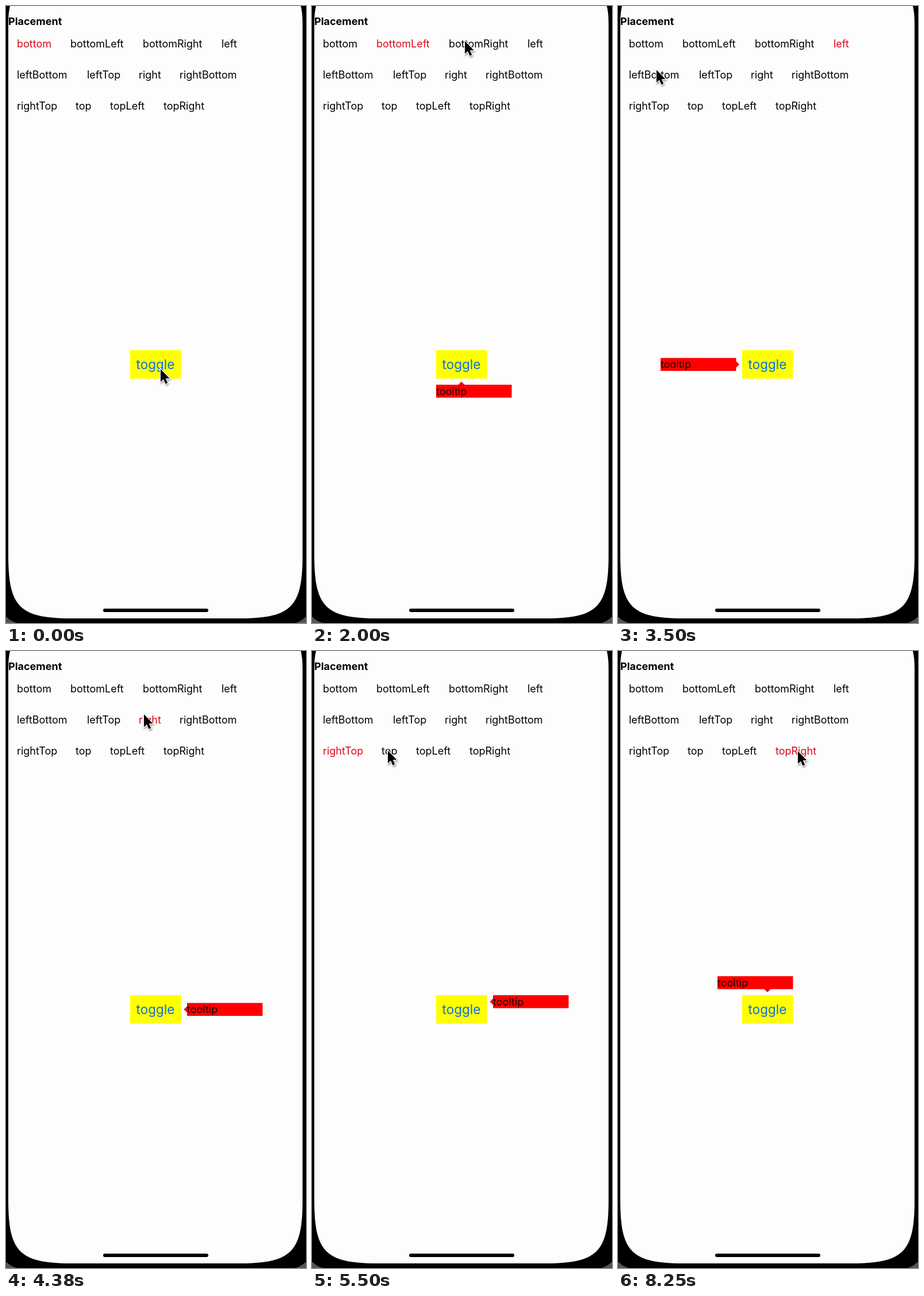
Animation of 522x1072 px, one loop 8370 ms. Source, as an HTML page:

```html
<!DOCTYPE html>
<html lang="en">
<head>
<meta charset="utf-8">
<title>Tooltip placement</title>
<style>
  html, body { margin: 0; width: 100%; height: 100%; overflow: hidden; background: #000; }
  svg { display: block; width: 522px; height: 1072px; font: 18px Inter, sans-serif; }
</style>
</head>
<body>
<svg viewBox="0 0 522 1072">
  <path fill="#555" d="M0 1061Q8 1069 19 1072H0ZM522 1061Q514 1069 503 1072H522Z"/>
  <path fill="#fdfdfd" d="M7 0Q4 12 4 30V954C4 1044 23 1064 114 1064H406C497 1064 516 1044 516 954V30Q516 12 513 0Z"/>
  <rect x="169" y="1047" width="183" height="6" rx="3"/>
  <text x="4" y="33" font-weight="700">Placement</text>
  <g id="options"></g>
  <rect x="216" y="598" width="88.5" height="49.5" fill="#ff0"/>
  <text x="260" y="631" font-size="22.5" text-anchor="middle" fill="#0870e4">toggle</text>
  <g id="tooltip">
    <rect width="131.5" height="22.5" fill="#f00"/>
    <path id="arrow" fill="#f00" d="M-6 .5L0 -5.5L6 .5Z"/>
    <text y="17.5" fill="#180000">tooltip</text>
  </g>
  <path id="cursor" d="M0 0V22L5 17.5L8.5 25.5L12.3 24L8.8 16H15.5Z" stroke="#fff" stroke-width="2.4"
    paint-order="stroke" style="filter: drop-shadow(1px 2px 1.5px #0006)"/>
</svg>
<script>
const LOOP = 8370, STEP = 125;
const $ = id => document.getElementById(id);

const rows = [
  { bottom: 19, bottomLeft: 112, bottomRight: 238, left: 375 },
  { leftBottom: 19, leftTop: 141, right: 231, rightBottom: 302 },
  { rightTop: 19, top: 121, topLeft: 181, topRight: 274 }
];
const labels = {};
rows.forEach((row, i) => {
  for (const [name, x] of Object.entries(row)) {
    const label = document.createElementNS('http://www.w3.org/2000/svg', 'text');
    label.setAttribute('x', x);
    label.setAttribute('y', 71.5 + 54 * i);
    label.textContent = name;
    labels[name] = $('options').appendChild(label);
  }
});

// Time of each selection
const picks = [
  [0, 'bottom'], [875, 'bottomLeft'], [2250, 'bottomRight'], [2875, 'left'],
  [3625, 'leftBottom'], [4125, 'leftTop'], [4375, 'right'], [4750, 'rightBottom'],
  [5250, 'rightTop'], [5750, 'top'], [6125, 'topLeft'], [7125, 'topRight']
];

// Pointer stops: time, x, y
const stops = [
  [0, 269, 631], [250, 269, 631], [500, 152, 280], [750, 142, 62], [1250, 142, 62],
  [1750, 266, 61], [2250, 266, 61], [2625, 385, 63], [2875, 385, 63], [3125, 406, 70],
  [3500, 67, 111], [3875, 67, 111], [4125, 160, 111], [4375, 240, 110], [4625, 318, 112],
  [4750, 318, 112], [5125, 80, 171], [5250, 80, 171], [5500, 132, 173], [5750, 132, 173],
  [6000, 200, 173], [6125, 200, 173], [6375, 268, 173], [6500, 268, 173], [6875, 313, 174],
  [LOOP, 313, 174]
];

const move = (el, x, y, turn = 0) =>
  el.setAttribute('transform', `translate(${x} ${y}) rotate(${turn})`);

function pointerAt(t) {
  const i = stops.findIndex(s => s[0] > t);
  const [t0, x0, y0] = stops[i - 1], [t1, x1, y1] = stops[i];
  const u = (t - t0) / (t1 - t0), k = u * u * (3 - 2 * u);
  return [x0 + (x1 - x0) * k, y0 + (y1 - y0) * k];
}

function placeTooltip(name) {
  const [, side, align] = name.match(/^([a-z]+)(.*)$/);
  if (side === 'top' || side === 'bottom') {
    const x = { Left: 216, Right: 173 }[align] ?? 194.5;
    const top = side === 'top';
    move($('tooltip'), x, top ? 565 : 658);
    move($('arrow'), 260 - x, top ? 22.5 : 0, top ? 180 : 0);
  } else {
    const y = { Top: 598, Bottom: 625 }[align] ?? 611.5;
    const left = side === 'left';
    move($('tooltip'), left ? 74 : 315, y);
    move($('arrow'), left ? 131.5 : 0, 11.25, left ? 90 : -90);
  }
}

function draw(now) {
  const t = Math.floor(now % LOOP / STEP) * STEP;
  const chosen = picks.findLast(p => p[0] <= t)[1];
  for (const name in labels) labels[name].setAttribute('fill', name === chosen ? '#dc0818' : '#000');
  $('tooltip').setAttribute('visibility', t < 250 ? 'hidden' : 'visible');
  placeTooltip(chosen);
  move($('cursor'), ...pointerAt(t));
  requestAnimationFrame(draw);
}
draw(0);
</script>
</body>
</html>
```
